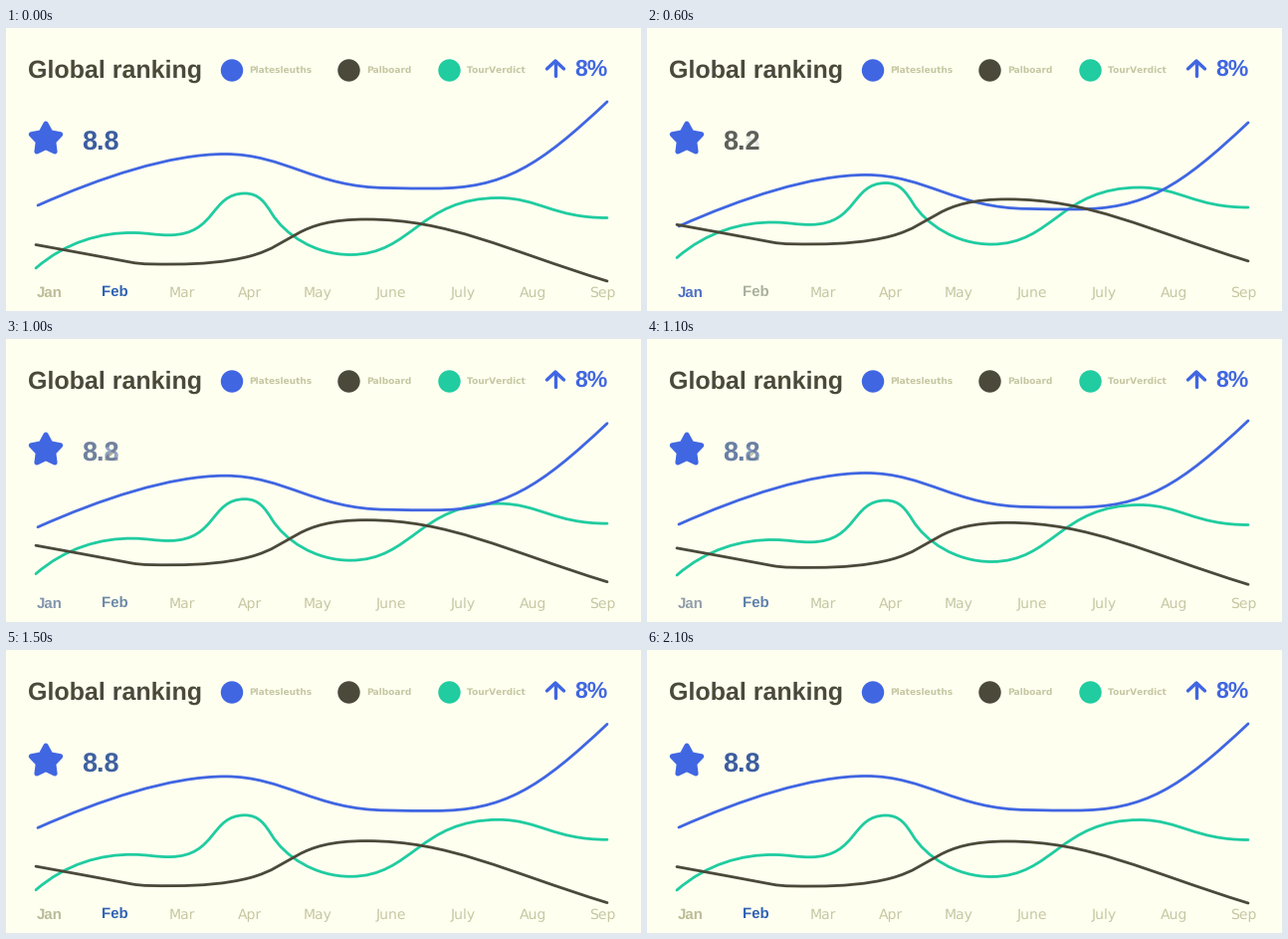
Recreate the animation shown at these times as a matplotlib script. Size 638 by 284 pixels, loop 3900 ms.

```python
import numpy as np
import matplotlib.pyplot as plt
from matplotlib.animation import FuncAnimation
from matplotlib.colors import to_rgb
from matplotlib.patches import Circle, PathPatch, Polygon
from matplotlib.path import Path
from matplotlib.transforms import Affine2D

W, H, DPI = 638, 284, 100
STEP_MS, FRAMES = 100, 39
PX = 72 / DPI  # points per pixel

PAPER = "#fffff0"
BLUE, DARK, TEAL = "#4066e2", "#4b4939", "#20cca0"
LABEL, LABEL_BOLD = "#c6c7a2", "#bcbd98"
JAN_BLUE, FEB_BLUE, SCORE_BLUE = "#3c63cc", "#2f63b4", "#3c5e9f"

plt.rcParams["text.hinting"] = "none"
plt.rcParams["text.hinting_factor"] = 1

fig = plt.figure(figsize=(W / DPI, H / DPI), dpi=DPI, facecolor=PAPER)
ax = fig.add_axes([0, 0, 1, 1])
ax.set_xlim(0, W)
ax.set_ylim(H, 0)
ax.axis("off")


def label(x, y, text, size, color, font="Liberation Sans", weight="bold", ha="left"):
    return ax.text(x, y, text, fontsize=size * PX, color=color, family=font,
                   weight=weight, ha=ha, va="baseline")


def curve(color, start, *segments, z=2):
    """Chain of cubic segments, each given as x1, y1, x2, y2, x, y."""
    points = np.vstack([[start], np.reshape(segments, (-1, 2))])
    codes = [Path.MOVETO] + [Path.CURVE4] * (len(points) - 1)
    patch = PathPatch(Path(points, codes), fc="none", ec=color, lw=2.8 * PX,
                      capstyle="round", joinstyle="round", zorder=z)
    return ax.add_patch(patch)


def mix(a, b, p):
    return tuple((1 - p) * np.array(to_rgb(a)) + p * np.array(to_rgb(b)))


# Header
label(22, 50, "Global ranking", 24.6, DARK)
for x, color, name in ((227, BLUE, "Platesleuths"),
                       (344.5, DARK, "Palboard"),
                       (445.5, TEAL, "TourVerdict")):
    ax.add_patch(Circle((x, 42.5), 11.2, fc=color, ec="none"))
    label(x + 17.5, 45, name, 9.3, LABEL, "DejaVu Sans")
arrow = dict(color=BLUE, lw=3.4 * PX, solid_capstyle="round", solid_joinstyle="round")
ax.plot([552, 552], [47.5, 34], **arrow)
ax.plot([543.5, 552, 560.5], [41, 33, 41], **arrow)
label(571.5, 48, "8%", 23, BLUE)

# Rating
angles = -np.pi / 2 + np.arange(10) * np.pi / 5
radii = np.where(np.arange(10) % 2 == 0, 15.5, 8.2)
star = np.column_stack([40 + radii * np.cos(angles), 111.5 + radii * np.sin(angles)])
ax.add_patch(Polygon(star, fc=BLUE, ec=BLUE, lw=5 * PX, joinstyle="round"))
old_score = label(76, 122.5, "8.2", 27, DARK)
new_score = label(76.5, 122.5, "8.8", 27, SCORE_BLUE)

# Months
jan = label(43.5, 270, "Jan", 14.5, JAN_BLUE, ha="center")
feb = label(109.5, 270, "Feb", 14.5, LABEL_BOLD, ha="center")
for x, month in ((177, "Mar"), (245, "Apr"), (313, "May"), (387, "June"),
                 (459.5, "July"), (530, "Aug"), (599, "Sep")):
    label(x, 270, month, 14, LABEL, "DejaVu Sans", "normal", "center")

# Each curve with its vertical offset at the start of the move
lines = [
    (curve(TEAL, (30, 241),
           (60, 215, 95, 205, 128, 205.5),
           (142, 205.5, 150, 208, 165, 207.8),
           (212, 207, 205, 166, 240, 166),
           (254, 166, 260, 175, 267, 186),
           (280, 207, 310, 227.5, 346, 227.5),
           (408, 227.5, 415, 170.5, 495, 170.5),
           (535, 170.5, 550, 190.5, 604, 190.5)), -12.1),
    (curve(BLUE, (32, 178),
           (95, 150, 165, 126.5, 220, 126.5),
           (280, 126.5, 310, 160, 383, 160.5),
           (400, 161, 415, 161, 430, 161),
           (500, 161, 535, 139, 604, 74), z=3), 24.2),
    (curve(DARK, (30, 217.5),
           (62, 223.5, 94, 229, 125, 235),
           (138, 237.5, 150, 237, 170, 237),
           (195, 237, 222, 235, 245, 229),
           (290, 217, 290, 192, 362, 192),
           (445, 192, 500, 222, 604, 254), z=4), -23.3),
]


def progress(i):
    if i == 0:
        return 1.0
    u = min(max((i - 3) / 13, 0), 1)
    return u * u * (3 - 2 * u)


def update(i):
    p = progress(i)
    for patch, offset in lines:
        patch.set_transform(Affine2D().translate(0, offset * (1 - p)) + ax.transData)
    old_score.set_alpha(1 - p)
    new_score.set_alpha(p)
    jan.set_color(mix(JAN_BLUE, LABEL_BOLD, p))
    feb.set_color(mix(LABEL_BOLD, FEB_BLUE, p))
    return [patch for patch, _ in lines] + [old_score, new_score, jan, feb]


anim = FuncAnimation(fig, update, frames=FRAMES, interval=STEP_MS,
                     repeat=True, repeat_delay=0, blit=False)
plt.show()
```
